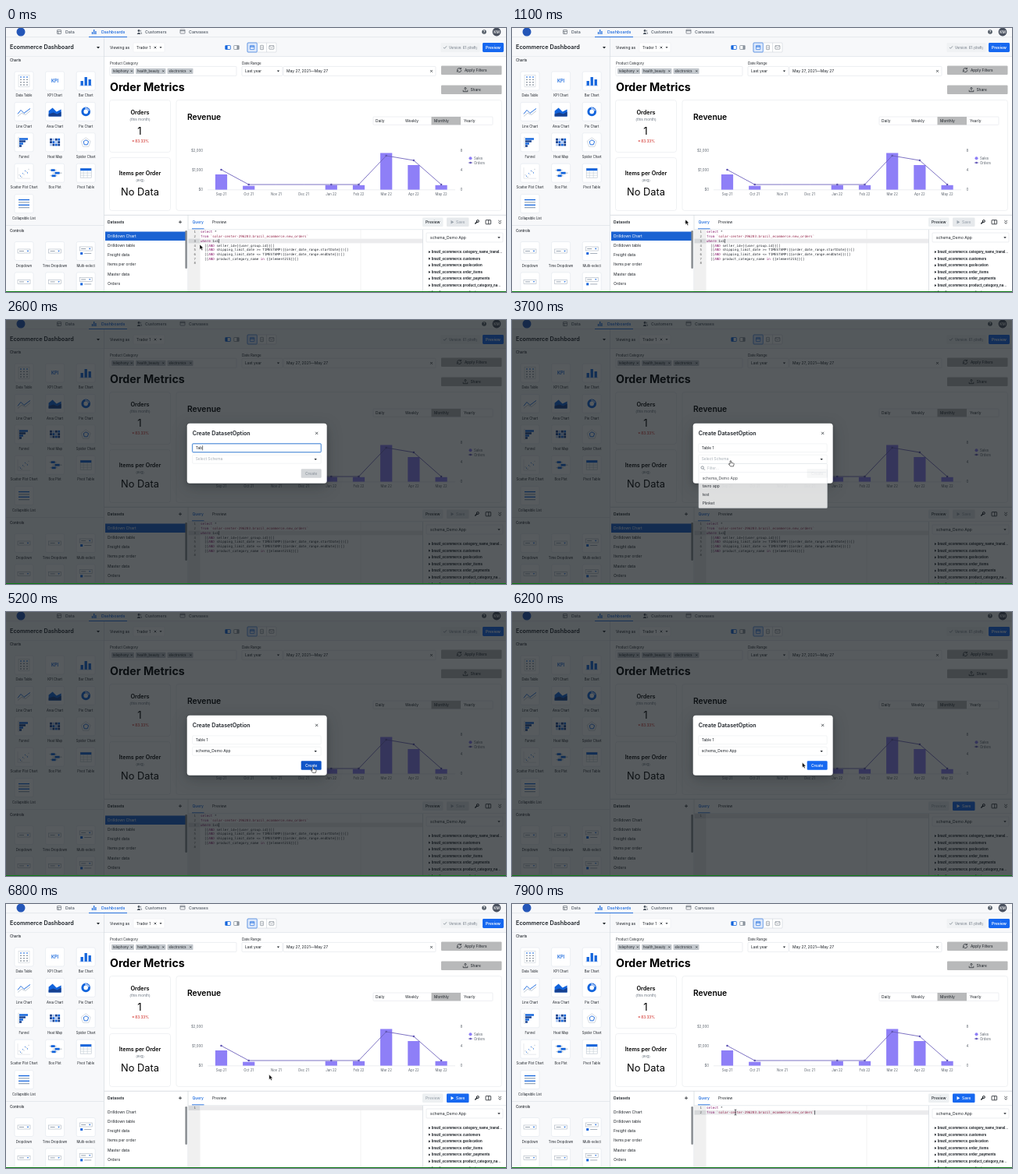
Recreate the animation shown at these times as an HTML page. Size 640 by 339 pixels, loop 8000 ms.

```html
<!DOCTYPE html>
<html lang="en">
<head>
<meta charset="utf-8">
<title>Dashboard editor</title>
<style>
html, body { margin: 0; width: 100%; height: 100%; overflow: hidden; background: #fff; }
svg { display: block; width: 100%; height: 100%; font-family: Inter, sans-serif; }
.mono { font-family: "DejaVu Sans Mono", monospace; }
text { white-space: pre; }
#dialog { filter: drop-shadow(0 1px 2px rgba(16, 22, 26, .25)) drop-shadow(0 5px 9px rgba(16, 22, 26, .25)); }
</style>
</head>
<body>
<svg id="stage" viewBox="0 0 640 339"></svg>
<script>
const BLUE = '#1264dc', INK = '#1c2127', GREY = '#6b7580', EDGE = '#dfe3e8', VIOLET = '#8e7ff7', PALE = '#f7f8fa';

const text = (x, y, s, size, fill = INK, weight = 400, anchor = 'start', more = '') =>
  `<text x="${x}" y="${y}" font-size="${size}" fill="${fill}" font-weight="${weight}" text-anchor="${anchor}" ${more}>${s}</text>`;
const mid = (x, y, s, size, fill, weight) => text(x, y, s, size, fill, weight, 'middle');
const rect = (x, y, w, h, fill = 'none', stroke = 'none', r = 0, sw = .6) =>
  `<rect x="${x}" y="${y}" width="${w}" height="${h}" rx="${r}" fill="${fill}" stroke="${stroke}" stroke-width="${sw}"/>`;
const path = (d, stroke = INK, sw = .7, fill = 'none') =>
  `<path d="${d}" stroke="${stroke}" stroke-width="${sw}" fill="${fill}"/>`;
const dot = (x, y, r, fill, stroke = 'none', sw = .7) =>
  `<circle cx="${x}" cy="${y}" r="${r}" fill="${fill}" stroke="${stroke}" stroke-width="${sw}"/>`;
const cross = (x, y, r = 1.4, c = INK) => path(`M${x - r} ${y - r}l${2 * r} ${2 * r}m0 ${-2 * r}l${-2 * r} ${2 * r}`, c);
const caret = (x, y, r = 1.7, c = INK) => path(`M${x - r} ${y - r / 2}h${2 * r}l${-r} ${r * 1.2}z`, 'none', 0, c);
const group = (id, body, more = '') => `<g id="${id}" ${more}>${body}</g>`;

function topBars() {
  let s = rect(0, 0, 640, 36.5, PALE) + path('M0 11.6H640', EDGE) + dot(19, 5, 5.5, '#2456b8');
  [['Data', 68, 76], ['Dashboards', 112.5, 122], ['Customers', 171, 178], ['Canvases', 226, 234]].forEach(([name, ix, x], i) => {
    const c = i === 1 ? BLUE : '#4d5661';
    if (i === 0) s += rect(ix - 2.5, 2.5, 5, 5, 'none', c, .5) + path(`M${ix - 2.5} 4.5h5m-3.3 0v3`, c, .6);
    if (i === 1) s += path(`M${ix - 2} 8v-3m2.2 3v-6m2.2 6v-4`, c, 1.2);
    if (i === 2) s += dot(ix - 1, 3.5, 1.4, c) + path(`M${ix - 3.4} 8q2.4 -4.6 4.8 0zM${ix + 1} 2.4a1.3 1.3 0 0 1 0 2.5q1.8 .4 2 2.6h-1`, 'none', 0, c);
    if (i === 3) s += rect(ix - 3, 2, 6, 5, 'none', c, .5) + path(`M${ix - 3} 3.6h6`, c, .8);
    s += text(x, 7, name, 5.3, c, 500);
  });
  s += rect(106, 11, 49, .9, BLUE);
  s += dot(612, 5, 2.8, '#4d5661') + mid(612, 6.7, '?', 4.6, '#fff', 700);
  s += dot(628, 5, 5.4, '#4b5260') + mid(628, 6.9, 'KM', 4.8, '#fff', 500);

  s += text(5, 27.3, 'Ecommerce Dashboard', 7.25, INK, 600) + caret(118, 25, 2);
  s += text(133, 26.8, 'Viewing as', 4.9) + rect(163, 19, 40, 12, '#fff', '#eceff2', 1);
  s += text(167, 26.6, 'Trader 1', 4.8) + cross(191, 25, 1.3) + caret(198, 25, 1.5);
  [[284, BLUE], [295, '#8a939d']].forEach(([x, c], i) =>
    s += rect(x - 3.3, 22.5, 6.6, 5, '#fff', c, .5, .8) + rect(i ? x + .4 : x - 3, 22.8, 2.6, 4.4, c));
  s += rect(309, 19, 37, 12, '#fff', '#cfd5db', 1) + rect(309, 19, 12.3, 12, '#dfeafb', BLUE, 1, .6) + path('M333.6 19v12', '#cfd5db');
  s += rect(312.4, 22.4, 5.4, 5.2, 'none', BLUE, .4) + path('M312.4 24h5.4', BLUE, 1);
  s += rect(325.6, 22.3, 3.8, 5.4, 'none', GREY, .4) + path('M326.6 24.5h2m-2 1.5h2', GREY, .4);
  s += rect(336.9, 22.6, 6, 4.6, 'none', GREY, .4) + path('M337 23l2.9 2.3 2.9 -2.3', GREY, .5);
  s += rect(556.5, 19, 50, 12, '#f0f2f4', 'none', 1.3);
  s += path('M560 24.9l1.4 1.4 2.6 -3', '#7c858f', .8) + text(567, 26.6, 'Version: 61 (draft)', 4.3, GREY);
  s += rect(610, 19, 27, 12, '#1668f0', 'none', 1.4) + mid(623.5, 26.8, 'Preview', 4.9, '#fff', 600);
  return s + path('M0 36.5H640', EDGE);
}

const icons = {
  'Data Table': (x, y) => [-5, -1.7, 1.7, 5].map(d => path(`M${x - 5} ${y + d}h2m2 0h2m2 0h2`, d < -4 ? BLUE : '#6d7a88', 1.1)).join('') + rect(x - 7, y - 7.5, 14, 15, 'none', '#ccd3db'),
  'KPI Chart': (x, y) => mid(x, y + 2, 'KPI', 5.6, BLUE, 600),
  'Bar Chart': (x, y) => path(`M${x - 5} ${y + 6}v-6m5 6v-11m5 11v-8`, BLUE, 3.3) + path(`M${x - 8} ${y + 6}h16`, '#8ab0ee', .6),
  'Line Chart': (x, y) => path(`M${x - 8} ${y + 3}l4 -5 4 4 4 -3 4 -3`, BLUE, .9) + path(`M${x - 8} ${y + 6}l5 -4 5 2 6 -5`, '#9aa9ba', .6),
  'Area Chart': (x, y) => path(`M${x - 8} ${y + 6}v-7l5 -4 5 5 6 -3v9z`, 'none', 0, BLUE) + path(`M${x - 8} ${y + 6}v-3l6 -2 5 2 5 -3v6z`, 'none', 0, '#16408f'),
  'Pie Chart': (x, y) => dot(x, y, 4.3, 'none', BLUE, 3) + path(`M${x} ${y - 6}v3.5m0 -1.5a4.3 4.3 0 0 1 4 3`, '#a9c6f5', 1.6),
  'Funnel': (x, y) => [11, 8, 5, 3].map((w, i) => rect(x - 6, y - 5.5 + i * 3, w, 2.4, i % 2 ? '#16408f' : BLUE)).join('') + path(`M${x - 7} ${y - 7}v14`, '#9aa9ba', .5),
  'Heat Map': (x, y) => [...Array(12).keys()].map(i => rect(x - 6.5 + i % 4 * 3.4, y - 5 + (i >> 2) * 3.4, 2.8, 2.8, ['#16408f', BLUE, '#a9c6f5'][i * 5 % 7 % 3])).join(''),
  'Spider Chart': (x, y) => path(`M${x} ${y - 6}l6 4.5 -2.3 7h-7.4l-2.3 -7z`, '#b8c2cd', .6) + path(`M${x} ${y - 3}l3.5 2 -1.5 4h-4l-1 -4z`, BLUE, .9),
  'Scatter Plot Chart': (x, y) => [...Array(9).keys()].map(i => dot(x - 6 + i * 1.5, y + 5 - i * 1.1 + (i * 7 % 5 - 2) * 1.2, .55, i % 2 ? BLUE : '#9aa9ba')).join('') + path(`M${x - 8} ${y - 7}v14h16`, '#ccd3db', .5),
  'Box Plot': (x, y) => path(`M${x - 7} ${y - 3.5}h9m-5 3.5h12m-15 3.5h9`, '#7f8d9d', .6) + rect(x - 5, y - 5, 5, 2.8, BLUE) + rect(x, y - 1.4, 6, 2.8, BLUE) + rect(x - 4, y + 2.2, 5, 2.8, BLUE),
  'Pivot Table': (x, y) => rect(x - 7, y - 6, 14, 12, '#fff', '#b8c2cd') + rect(x - 7, y - 6, 14, 3, BLUE) + path(`M${x - 7} ${y}h14m-14 3h14m-10 -6v9m5 -9v9`, '#b8c2cd', .5),
  'Collapsible List': (x, y) => [-5, -1.7, 1.7, 5].map((d, i) => path(`M${x - 7} ${y + d}h14`, i % 2 ? '#9aa9ba' : BLUE, 1.3)).join('')
};
const field = (x, y) => rect(x - 8, y - 2.5, 16, 5, '#fff', '#aab4bf') + path(`M${x - 6} ${y}h6`, '#7f8d9d', .8) + caret(x + 5, y, 1.3, BLUE);
const check = (x, y) => field(x, y - 3) + rect(x - 7, y + 1.5, 3, 3, BLUE) + path(`M${x - 2} ${y + 3}h9`, '#7f8d9d', .7);

function sidebar() {
  const tile = (x, y, label, icon) => rect(x - 12, y - 12, 24, 24, '#fff', '#e1e6ec', 2) + icon(x, y) + (label ? mid(x, y + 20.2, label, 4.2) : '');
  let s = rect(0, 36.8, 125.5, 303, PALE) + text(5, 42.6, 'Charts', 4.5, INK, 500) + text(5, 261.5, 'Controls', 4.5, INK, 500);
  Object.entries(icons).forEach(([name, icon], i) => s += tile(23 + i % 3 * 39.6, 68 + Math.floor(i / 3) * 39.4, name, icon));
  ['Dropdown', 'Time Dropdown', 'Multi-select', '', '', ''].forEach((name, i) =>
    s += tile(23 + i % 3 * 39.6, 286.5 + (i > 2) * 39.4, name, i % 3 === 2 ? check : field));
  return s + path('M0 253.5H125', EDGE) + path('M125.5 12V339', '#d5dae0');
}

function filters() {
  let s = text(133, 46.3, 'Product Category', 4.3) + rect(133, 49, 162, 12, '#fff', EDGE, 1);
  [['telephony', 135, 29], ['health_beauty', 166, 38.5], ['electronics', 206.5, 33]].forEach(([n, x, w]) =>
    s += rect(x, 51.3, w, 7.4, '#c3c8cd', 'none', 1) + text(x + 2, 56.6, n, 4.25) + cross(x + w - 3.2, 55, 1));
  s += text(302, 46.3, 'Date Range', 4.5) + rect(302, 49, 52, 12, '#fff', EDGE, 1) + text(306, 56.9, 'Last year', 4.9) + caret(348.5, 55, 1.6);
  s += rect(355, 49, 195, 12, '#fff', EDGE, 1) + text(359, 56.9, 'May 27, 2021—May 27', 5) + cross(544.5, 55);
  s += rect(557, 48, 77.5, 11.5, '#b8b9ba', 'none', 1) + text(587, 55.8, 'Apply Filters', 4.85);
  s += path('M577.6 53.5a2.6 2.6 0 0 1 4.6 -1.4m.6 1.6a2.6 2.6 0 0 1 -4.6 1.6m4.2 -4.8v1.8h-1.8m-3.2 3.8v-1.8h1.8', INK, .7);
  s += rect(557, 73, 77.5, 11.5, '#b8b9ba', 'none', 1) + text(594.5, 80.6, 'Share', 4.85);
  s += path('M588 80v-4m-1.6 1.5l1.6 -1.6 1.6 1.6m-4.4 1.8v2h5.6v-2', INK, .7);
  return group('filters', s, 'transform="translate(0 .4)"');
}

function metrics() {
  let s = text(133, 81.2, 'Order Metrics', 14.2, '#000', 700);
  s += rect(132.5, 92.5, 78, 67, '#fff', '#e6e9ed', 3) + rect(132.5, 166.5, 78, 68, '#fff', '#e6e9ed', 3) + rect(218, 92.5, 416.5, 142, '#fff', '#e6e9ed', 3);
  s += mid(171.5, 110.8, 'Orders', 7.3, '#000', 600) + mid(171.5, 119.4, '(this month)', 4.7, GREY) + mid(171, 136.8, '1', 13.2, '#000');
  s += caret(162.8, 145.2, 1.4, '#d2322d') + text(165.3, 146.8, '83.33%', 4.7, '#d2322d', 500);
  s += mid(171.5, 189, 'Items per Order', 7.1, '#000', 600) + mid(171.5, 197.2, '(avg)', 4.4, GREY) + mid(171.5, 215, 'No Data', 12.8, '#000');
  s += text(232, 118.4, 'Revenue', 10.3, '#000', 600);
  s += rect(470, 114, 153, 10.4, '#fff', '#e2e5e9', 1) + rect(544.5, 114, 37.5, 10.4, '#b8b9ba');
  [['Daily', 473], ['Weekly', 511], ['Monthly', 548], ['Yearly', 586]].forEach(([n, x]) => s += text(x, 121, n, 4.9));
  [['$2,000', 8], ['$1,000', 4], ['$0', 0]].forEach(([n, v], i) => {
    const y = 158.7 + i * 25.2;
    s += text(252, y, n, 4.4, '#59616b', 400, 'end') + text(581.5, y, v, 4.4, '#59616b');
  });
  s += path('M258 207.8H575', '#dde1e6', .6);
  const px = i => 275.5 + i * 35.2;
  const tops = [188, 202.7, 0, 0, 201.8, 201.8, 160.5, 176, 201.8];
  const line = [182, 201, 201, 201, 201, 201, 164, 170, 201];
  ['Sep 21', 'Oct 21', 'Nov 21', 'Dec 21', 'Jan 22', 'Feb 22', 'Mar 22', 'Apr 22', 'May 22'].forEach((n, i) => {
    if (tops[i]) s += rect(px(i) - 7.6, tops[i], 15.2, 207.6 - tops[i], VIOLET);
    s += mid(px(i), 215, n, 4.3, '#59616b');
  });
  s += path('M' + line.map((y, i) => px(i) + ' ' + y).join('L'), '#6f63bd', .9);
  line.forEach((y, i) => { if (tops[i]) s += dot(px(i), y, 1.3, '#6257b5'); });
  s += dot(594.5, 167.2, 2, VIOLET) + text(599, 168.9, 'Sales', 4.3, '#59616b');
  return s + path('M591.8 173H597.2', '#6f63bd', .8) + dot(594.5, 173, 1.3, '#6257b5') + text(599, 174.6, 'Orders', 4.3, '#59616b');
}

const COL = 2.558, KEY = '#8a1f6e', STR = '#962a4e';
const lineY = n => 263.4 + (n - 1) * 5.72;
const code = (n, s) => text(249, lineY(n), s, 4.25, '#23272e', 400, 'start', 'class="mono" xml:space="preserve"');
const word = (s, c = KEY) => `<tspan fill="${c}">${s}</tspan>`;
const lineNo = n => text(243, lineY(n), n, 4, '#555', 400, 'end', 'class="mono"');
const activeLine = n => rect(233.5, lineY(n) - 4.2, 15, 5.7, '#d6d8da') + rect(248.5, lineY(n) - 4.2, 285, 5.7, '#ebebed');
const query = code(1, word('select') + ' *') + code(2, word('from') + ' ' + word('`solar-center-296203.brazil_ecommerce.new_orders`', STR));
const save = (on) => rect(564, 243.5, 28.5, 11.5, on ? '#1668f0' : '#e6e9ec', 'none', 1.3) +
  path('M569.5 247v4.6l3.8 -2.3z', 'none', 0, on ? '#fff' : '#9aa3ac') + text(576, 251.1, 'Save', 4.9, on ? '#fff' : '#9aa3ac', 500);

function panel() {
  let s = rect(126, 240, 514, 99, '#fff') + path('M126 240.3H640', '#d2d7dd', .8);
  s += text(130, 251, 'Datasets', 5, INK, 600) + path('M221 249.2h4m-2 -2v4', INK, .8);
  s += group('picked', rect(127, 261.5, 104, 11.5, '#1a62d2'));
  ['Drilldown Chart', 'Drilldown table', 'Freight data', 'Items per order', 'Master data', 'Orders'].forEach((n, i) =>
    s += text(130, 269.1 + i * 12.1, n, 5, INK, 400, 'start', i ? '' : 'id="first"'));
  s += rect(229.4, 260, 2.4, 49, '#85898e', 'none', 1.2) + path('M233 240V339', '#d2d7dd');
  s += text(238.5, 251, 'Query', 4.9, BLUE, 500) + rect(238, 257.4, 15.5, 1.1, BLUE) + text(264, 251, 'Preview', 4.9);
  s += rect(533, 243.5, 26.5, 11.5, '#edf0f2', 'none', 1.3) + text(546.3, 251.1, 'Preview', 4.9, INK, 500, 'middle', 'id="run"');
  s += group('saveOff', save(false)) + group('saveOn', save(true));
  s += path('M600.3 251.5l3 -3', INK, 1.4) + dot(603.8, 248, 1.5, 'none', INK, 1);
  s += rect(614, 246.6, 6.6, 5.2, 'none', INK, .4, .8) + path('M617.8 246.6v5.2', INK, .8);
  s += path('M630.3 247l1.8 1.7 1.8 -1.7m-3.6 2.6l1.8 1.7 1.8 -1.7', INK, .8) + path('M233 258.7H640', EDGE);
  s += rect(233.3, 259, 15.2, 80, '#f0f0f0') + path('M454 259V339', '#e4e4e6', .5);
  const ship = (op, end) => `  [[${word('AND')} shipping_limit_date ${op} TIMESTAMP({{order_date_range.${end}Date}})]]`;
  s += group('before', activeLine(3) + [1, 2, 3, 4, 5, 6, 7, 8].map(lineNo).join('') + query + code(3, word('where') + ' 1=1') +
    code(4, `  [[${word('AND')} seller_id={{user_group.id}}]]`) + code(5, ship('&gt;=', 'start')) + code(6, ship('&lt;=', 'end')) +
    code(7, `  [[${word('AND')} product_category_name ${word('in')} {{element215}}]]`) + rect(249 + 9 * COL, lineY(3) - 4, .6, 5.4, INK));
  s += group('blank', activeLine(1) + lineNo(1)) + group('blankCaret', rect(249, lineY(1) - 4, .6, 5.4, INK));
  s += group('pasted', activeLine(2) + lineNo(1) + lineNo(2) + query + rect(249.2 + 54 * COL, lineY(2) - 4, .7, 5.4, INK));
  s += rect(533.5, 259, 107, 80, '#fff') + path('M533.5 259V339', '#d2d7dd') + rect(538, 263, 98, 12, '#fff', EDGE, 1);
  s += text(543, 271, 'schema_Demo App', 5) + caret(631, 269, 1.7);
  ['category_name_transl...', 'customers', 'geolocation', 'order_items', 'order_payments', 'product_category_na...', 'products'].forEach((n, i) => {
    const y = 289 + i * 8.6;
    s += path(`M541 ${y - 3}v3.2l2.2 -1.6z`, 'none', 0, INK) + text(544.7, y, 'brazil_ecommerce.' + n, 4.3, INK, 700);
  });
  return s;
}

function dialog() {
  let s = rect(232, 132.5, 179, 77, '#fff', 'none', 3.5) + text(239, 148, 'Create DatasetOption', 7.1, INK, 600) + cross(398, 145.2, 1.6);
  s += group('nameBox', rect(239, 158.7, 164.5, 10.8, '#fff', '#e9ecef', 1));
  s += group('focus', rect(238.6, 158.3, 165.3, 11.6, 'none', '#b5d2f6', 1.4, 1) + rect(239, 158.7, 164.5, 10.8, '#fff', '#2a73c9', 1, .8));
  s += text(243, 166, '', 4.85, INK, 400, 'start', 'id="name"') + group('nameCaret', rect(0, 161, .6, 6.2, INK));
  s += rect(239, 173, 164.5, 11, '#fff', '#e9ecef', 1) + text(243, 180.3, '', 4.9, INK, 400, 'start', 'id="schema"') + caret(396.5, 178.6, 1.7);
  s += `<rect id="create" x="378" y="191" width="26" height="11.6" rx="1.3"/>` + text(391, 198.7, 'Create', 4.9, '#fff', 500, 'middle', 'id="createText"');
  return s;
}

function menu() {
  let s = rect(239, 184.5, 164.5, 57, '#fff', '#d9dee3', 1) + dot(243.7, 189.5, 1.7, 'none', '#55606b', .8) + path('M245 190.8l1.8 1.8', '#55606b', .8);
  s += text(250, 191.8, 'Filter...', 4.7, '#9aa3ac') + path('M240.5 195.5H402', EDGE, .5) + `<rect id="hover" x="240.5" y="197.8" width="161.5" height="10" rx="1" fill="#e8edf2"/>`;
  ['schema_Demo App', 'tavro app', 'test', 'Plinket'].forEach((n, i) => s += text(243.7, 204.6 + i * 10.75, n, 4.95));
  return s;
}

const pointers = group('arrow', path('M0 0v6.4l1.5 -1.3 1.1 2.4 1.2 -.5 -1.1 -2.4h2z', '#fff', .5, '#000')) +
  group('hand', path('M-.9 0q.8 -1.1 1.5 0v2.3l3 .7q.7 .3 .5 1.3l-.7 2.6h-3.8l-2.3 -3q.4 -.9 1.8 .2z', '#111', .6, '#fff')) +
  group('beam', path('M-1.3 -3.6q1.3 0 1.3 1v5.2q0 1 -1.3 1m2.6 -7.2q-1.3 0 -1.3 1m0 5.2q0 1 1.3 1', INK, .7));

document.getElementById('stage').innerHTML = rect(0, 0, 640, 339, '#fff') + topBars() + sidebar() + filters() + metrics() + panel() +
  group('shade', rect(0, 0, 640, 339, '#10161a')) + group('dialog', dialog()) + group('menu', menu()) + group('pointer', pointers) +
  rect(0, 338, 640, 1, '#0b7a14');

const el = {};
document.querySelectorAll('[id]').forEach(n => el[n.id] = n);
const show = (id, on) => el[id].style.display = on ? '' : 'none';
const ramp = (t, a, b) => Math.min(1, Math.max(0, (t - a) / (b - a)));

// time, x, y of the pointer
const moves = [[0, 248, 278], [200, 248, 278], [900, 222, 246], [1500, 222, 246], [2100, 282, 164], [3100, 282, 164],
  [3550, 280, 181], [3850, 280, 181], [4250, 268, 203], [4500, 268, 203], [5150, 393, 199.5], [5650, 393, 199.5],
  [6400, 367, 192], [6550, 362, 195], [7200, 286, 267.5], [8000, 286, 267.5]];
function pointerAt(t) {
  const i = moves.findIndex(m => m[0] > t), a = moves[i - 1], b = moves[i];
  const k = ramp(t, a[0], b[0]), e = k * k * (3 - 2 * k);
  return [a[1] + (b[1] - a[1]) * e, a[2] + (b[2] - a[2]) * e];
}

function draw(t) {
  const open = ramp(t, 1180, 1380) * (1 - ramp(t, 6250, 6453));
  const dim = ramp(t, 1160, 1350) * (1 - ramp(t, 6250, 6425));
  const fresh = t >= 6200, pasted = t >= 7400;
  show('picked', !fresh);
  el.first.setAttribute('fill', fresh ? INK : '#fff');
  show('before', !fresh);
  show('blank', fresh && !pasted);
  show('blankCaret', t >= 7200 && !pasted);
  show('pasted', pasted);
  show('saveOff', !fresh);
  show('saveOn', fresh);
  el.run.setAttribute('fill', fresh && !pasted ? '#9aa3ac' : INK);

  el.shade.setAttribute('opacity', .7 * dim);
  show('dialog', open > 0);
  el.dialog.setAttribute('opacity', Math.max(open, dim));
  el.dialog.setAttribute('transform', `translate(321.2 171.2) scale(${.5 + .5 * open}) translate(-321.5 -171)`);

  const typed = 'Table 1'.slice(0, Math.max(0, Math.floor((t - 2300) / 100)));
  const focused = t >= 2100 && t < 3550;
  show('focus', focused);
  show('nameBox', !focused);
  el.name.textContent = typed || 'Dataset Name';
  el.name.setAttribute('fill', typed ? INK : '#a3abb3');
  show('nameCaret', focused);
  if (focused) {
    const w = typed ? el.name.getComputedTextLength() : 0;
    el.nameCaret.setAttribute('transform', `translate(${243.3 + w} 0)`);
  }
  const chosen = t >= 4400;
  el.schema.textContent = chosen ? 'schema_Demo App' : 'Select Schema';
  el.schema.setAttribute('fill', chosen ? INK : '#a3abb3');
  el.create.setAttribute('fill', !chosen ? '#d3d6d9' : t > 5050 && t < 5800 ? '#0f55c8' : '#1668f0');
  el.createText.setAttribute('fill', chosen ? '#fff' : '#8f979f');

  const drop = ramp(t, 3580, 3730) * (1 - ramp(t, 4400, 4550));
  show('menu', drop > 0);
  el.menu.setAttribute('opacity', drop);
  const [x, y] = pointerAt(t);
  show('hover', y > 197 && t < 4600);
  el.pointer.setAttribute('transform', `translate(${x} ${y})`);
  const hand = (t >= 3400 && t < 4500) || (t >= 5000 && t < 5800);
  const beam = (t >= 1980 && t < 3400) || t >= 7050;
  const hidden = t >= 2450 && t < 3100;
  show('hand', hand);
  show('beam', beam && !hidden);
  show('arrow', !hand && !beam);
}

function tick() {
  draw(performance.now() % 8000);
  requestAnimationFrame(tick);
}
tick();
</script>
</body>
</html>
```
